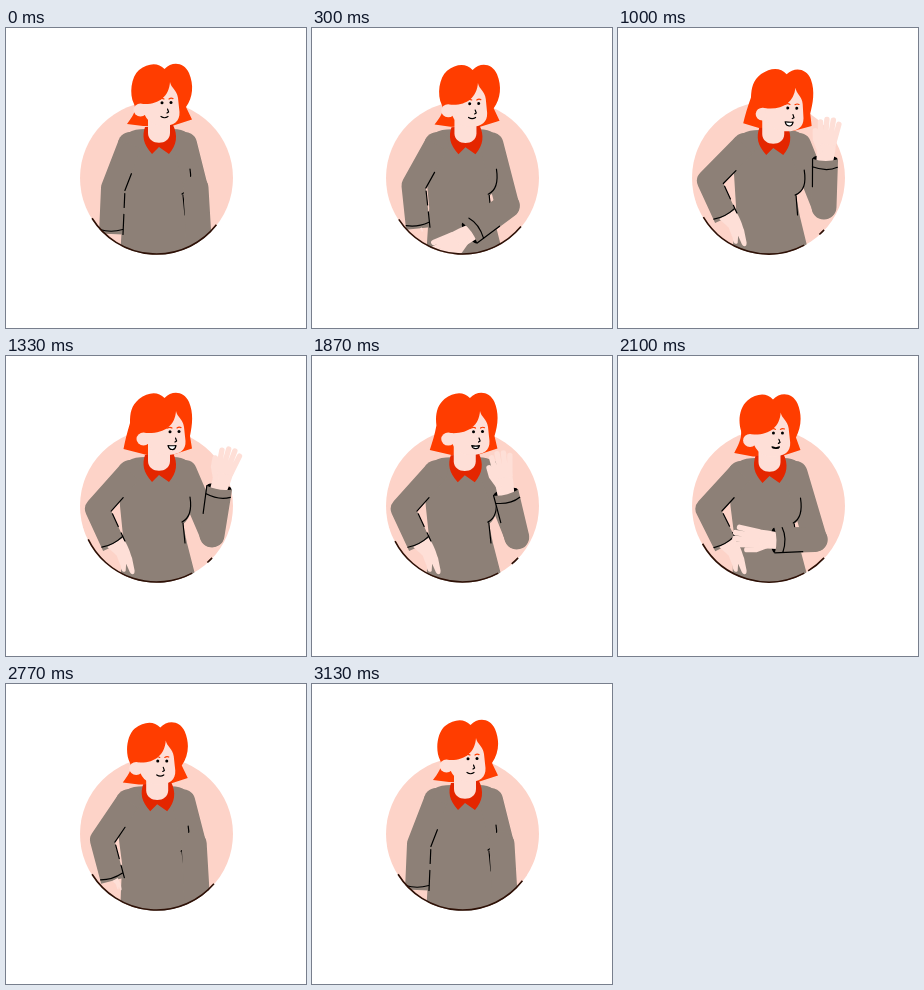
An HTML page for the animation above (3160 ms loop, 300x300 px).

```html
<!DOCTYPE html>
<html lang="en">
<head>
<meta charset="utf-8">
<title>Waving woman</title>
<style>
  html, body { margin: 0; width: 100%; height: 100%; overflow: hidden; background: #fff; }
  svg { display: block; width: 100vw; height: 100vh; }
  .skin { fill: #fedfd7; }
  .wool { fill: #8d8077; }
  .hair { fill: #ff3d00; }
  .line { fill: none; stroke: #000; stroke-width: 1.2; stroke-linecap: round; stroke-linejoin: round; }
  .sleeve { fill: none; stroke: #8d8077; stroke-width: 24; stroke-linejoin: round; }
  .finger { fill: none; stroke: #fedfd7; stroke-width: 5.4; stroke-linecap: round; stroke-linejoin: round; }
</style>
</head>
<body>
<svg viewBox="0 0 300 300">
  <defs>
    <clipPath id="window">
      <path d="M0 0H300V172H223.8A76.5 76.5 0 0 1 77.2 172H0Z"/>
    </clipPath>
  </defs>
  <circle cx="150.5" cy="150" r="76.5" fill="#fdd3c8"/>
  <g clip-path="url(#window)">
    <path id="hair" class="hair"/>
    <path id="torso" class="wool"/>
    <circle id="leftShoulder" class="wool" r="12"/>
    <path id="leftSleeve" class="sleeve"/>
    <g id="leftHand">
      <path class="skin" d="M-4 -9C6 -10 12 -8 18 -7L30 -3C34 -1 33 2 29 2L20 1L26 5C27 8 23 9 20 7L8 5L-4 9Z"/>
    </g>
    <path id="leftLine" class="line"/>
    <path id="leftCrease" class="line" stroke-dasharray="14 7 40"/>
    <path id="leftCuff" class="line"/>
    <path id="rightUpper" class="sleeve" stroke-linecap="round"/>
    <path id="sideLine" class="line"/>
    <g id="neck">
      <path fill="#e42600" d="M139 99C136 108 137 116 146 126L153 119L163 126C171 117 172 107 167 97Z"/>
      <path class="skin" d="M142 88H164V105C164 118 142 118 142 105Z"/>
    </g>
    <g id="head">
      <ellipse id="ear" class="skin" cy="82" rx="7" ry="6.5"/>
      <path id="face" class="skin"/>
      <g id="features">
        <path class="line" style="stroke:#ff3d00" d="M153 71.2Q156 69.6 158 71M163 71Q165 69.6 167 70.6"/>
        <circle cx="156" cy="74.7" r="1.5"/>
        <circle cx="165" cy="74.5" r="1.5"/>
        <path class="line" d="M161.5 81L162.6 84L161 85"/>
        <path id="mouth" class="line"/>
      </g>
    </g>
    <g id="forearm">
      <ellipse id="opening" rx="4" ry="12.5"/>
      <g id="rightHand">
        <path class="skin" d="M-8 -8L6 -9Q14 -10 21 -9Q25 0 20 9L8 9L-8 8Z"/>
        <path id="fingers" class="finger"/>
      </g>
      <path id="rightLower" class="wool"/>
      <path id="rightLines" class="line"/>
    </g>
  </g>
  <path id="rim" fill="none" stroke="#2d1006" stroke-width="1.6"/>
</svg>
<script>
const LOOP = 3160;
const WAVE_PEAK = 690;
const WAVE_PERIOD = 860;

const el = {};
document.querySelectorAll("svg [id]").forEach(node => { el[node.id] = node; });
const set = (id, name, value) => el[id].setAttribute(name, value);
const draw = (id, d) => set(id, "d", d);
const mix = (a, b, k) => a + (b - a) * k;
const deg = Math.PI / 180;

function ease(t, from, to) {
  const u = Math.min(1, Math.max(0, (t - from) / (to - from)));
  return u * u * (3 - 2 * u);
}

// Eases from 0 to 1, holds, and eases back to 0.
const pulse = (t, rise, top, fall, end) => ease(t, rise, top) * (1 - ease(t, fall, end));

// The five gestures that every part of the pose is built from.
function gestures(t) {
  return {
    raise: pulse(t, 80, 670, 1750, 2450),
    wave: Math.cos(2 * Math.PI * (t - WAVE_PEAK) / WAVE_PERIOD),
    hip: pulse(t, 60, 670, 2480, 3130),
    greet: pulse(t, 200, 680, 720, 1330),
    recoil: pulse(t, 1750, 2450, 2500, 3130),
    turn: pulse(t, 300, 650, 1600, 2450)
  };
}

function unit(ax, ay, bx, by) {
  const length = Math.hypot(bx - ax, by - ay);
  return [(bx - ax) / length, (by - ay) / length];
}

function drawHead({ greet, recoil, turn }) {
  const x = 13 * greet - 7 * recoil;
  const y = 8 * greet + 4 * recoil + turn * (1 - greet);
  const place = `translate(${x} ${y}) rotate(${5 * greet} 153 100)`;
  const look = Math.max(0, turn - 0.6 * greet);
  const s = 6 * look;
  const ear = mix(137, 140, look);
  const h = (a, b) => mix(a, b, turn);
  set("hair", "transform", place);
  set("head", "transform", place);
  draw("hair", `M${h(128, 124)} ${h(76, 66)}C${h(123, 124)} ${h(66, 56)} 125 49 133 42C142 35 152 34 158.5 41`
    + `C166 33 178 34 183 45C188 57 ${h(187, 186)} 69 ${h(180, 184)} 79L186 91.5`
    + `L166 98H${h(137, 141)}L${h(121, 117.5)} ${h(96, 92)}`
    + `C${h(127, 119)} ${h(88, 84)} ${h(131, 121)} ${h(82, 76)} ${h(128, 124)} ${h(76, 66)}Z`);
  set("ear", "cx", ear - 2.5);
  draw("face", `M${ear} 76C${152 + s} 77 ${163 + s} 69 ${164 + s} 54`
    + `C${165 + s} 60 ${171 + s} 62 ${172 + s} 70L${173.5 + s} 84`
    + `C${174 + s} 93 ${168 + s} 98 ${157 + s / 2} 98C${145 + s / 2} 98 ${ear} 90 ${ear} 78Z`);
  set("features", "transform", `translate(${8 * look} 0)`);
  const open = 4 * turn;
  draw("mouth", `M${155 - turn} 88.5Q158.5 ${91 - 0.5 * open} 162 88.5`
    + (open > 1 ? `Q161 ${89 + open} 158 ${88.5 + open}Q155 ${88.5 + open} ${155 - turn} 88.5Z` : ""));
  el.mouth.style.fill = open > 1 ? "#fff" : "none";
}

function drawBody(x, y) {
  const half = x / 2;
  set("neck", "transform", `translate(${x} ${y})`);
  draw("torso", `M${139 + x} ${101 + y}C${126 + x} ${101 + y} ${116 + x} ${105 + y} ${112 + x} ${118 + y}`
    + `L${114 + x} 150L${117 + half} 180L114 230H192L${181 + half / 2} 187L${177 + half} 168`
    + `Q${189 + x} 160 ${189 + x} ${120 + y}C${186 + x} ${106 + y} ${179 + x} ${101 + y} ${167 + x} ${101 + y}Z`);
  draw("sideLine", `M${184 + x} ${141 + y}C${186 + x} ${154 + y} ${184 + x} ${162 + y} ${176 + half} ${166 + y}`
    + `M${177 + half} ${167 + y}L${179 + half / 2} 187`);
}

function drawLeftArm({ hip, recoil }, bx, by) {
  const sx = 124 + bx, sy = 116 + by;
  const ex = mix(107, 91, hip) - 3 * recoil, ey = mix(160, 153, hip);
  const wx = mix(105, 108, hip), wy = mix(206, 190, hip);
  const [ux, uy] = unit(sx, sy, ex, ey);
  const [fx, fy] = unit(ex, ey, wx, wy);
  // Inner corner of the elbow, where both inner edges meet.
  const reach = 12 / (1 + ux * fx + uy * fy);
  const cx = ex + (uy + fy) * reach, cy = ey - (ux + fx) * reach;
  const at = (back, side) => `${wx - fx * back + fy * side} ${wy - fy * back - fx * side}`;
  set("leftShoulder", "cx", sx);
  set("leftShoulder", "cy", sy);
  draw("leftSleeve", `M${sx} ${sy}L${ex} ${ey}L${wx} ${wy}`);
  draw("leftLine", `M${cx} ${cy}L${cx - ux * 18} ${cy - uy * 18}`);
  draw("leftCrease", `M${cx + fx * 3} ${cy + fy * 3}L${at(0, 12)}`);
  draw("leftCuff", `M${at(4, -11.5)}Q${at(1, 0)} ${at(5, 11.5)}`);
  set("leftHand", "transform", `translate(${wx + 3} ${wy}) rotate(60) scale(${hip * hip})`);
}

function drawRightArm({ raise, wave }, bx, by) {
  const swing = Math.sin(Math.PI * raise);
  const ex = mix(190 + bx, 206, raise);
  const ey = mix(160, 179, raise) + 14 * swing;
  const angle = mix(87, 279 + 12 * wave, raise);
  const length = 48 + 27 * (1 - raise) ** 4 - 9 * swing;
  const spread = raise * Math.max(0.25, wave);
  draw("rightUpper", `M${179 + bx} ${116 + by}L${ex} ${ey}`);
  set("forearm", "transform", `translate(${ex} ${ey}) rotate(${angle})`);
  draw("rightLower", `M0 -12.5L${length} -13Q${length - 4} 0 ${length} 13L0 12.5A12.5 12.5 0 0 1 0 -12.5Z`);
  set("opening", "cx", length);
  draw("rightLines", `M${length - 8} -12.5Q${length - 13} 2 ${length - 8} 12.5`
    + `M${length} -12.5L${length - 28} -12`);
  set("rightHand", "transform", `translate(${length} 0) rotate(${10 + 6 * wave * raise})`);
  let hand = `M7 -6L${17 + 4 * spread} ${-11 - 4 * spread}L${26 + 3 * spread} ${-12 - 5 * spread}`;
  for (let n = -1.5; n < 2; n++) {
    const a = n * (3 + 9 * spread) * deg;
    const reach = 23 - 1.6 * n * n;
    hand += `M17 ${n * 4.4}L${17 + reach * Math.cos(a)} ${n * 4.4 + reach * Math.sin(a)}`;
  }
  draw("fingers", hand);
}

function drawRim({ raise, hip, turn, greet }) {
  const point = a => `${150.5 + 76 * Math.cos(a * deg)} ${150 + 76 * Math.sin(a * deg)}`;
  const arc = (a, b) => `M${point(a)}A76 76 0 0 0 ${point(b)}`;
  const start = 148 + 6 * turn - 9 * greet;
  const end = 38 + 5 * hip;
  const gap = Math.max(0, 1.5 * raise - 0.5);
  draw("rim", gap ? arc(start, 62) + arc(62 - 14 * gap, end) : arc(start, end));
}

function render(t) {
  const pose = gestures(t);
  const bx = 4 * pose.greet - 3 * pose.recoil;
  const by = 2 * pose.greet + 2 * pose.recoil;
  drawHead(pose);
  drawBody(bx, by);
  drawLeftArm(pose, bx, by);
  drawRightArm(pose, bx, by);
  drawRim(pose);
}

const began = performance.now();
function tick() {
  render((performance.now() - began) % LOOP);
  requestAnimationFrame(tick);
}
tick();
</script>
</body>
</html>
```
